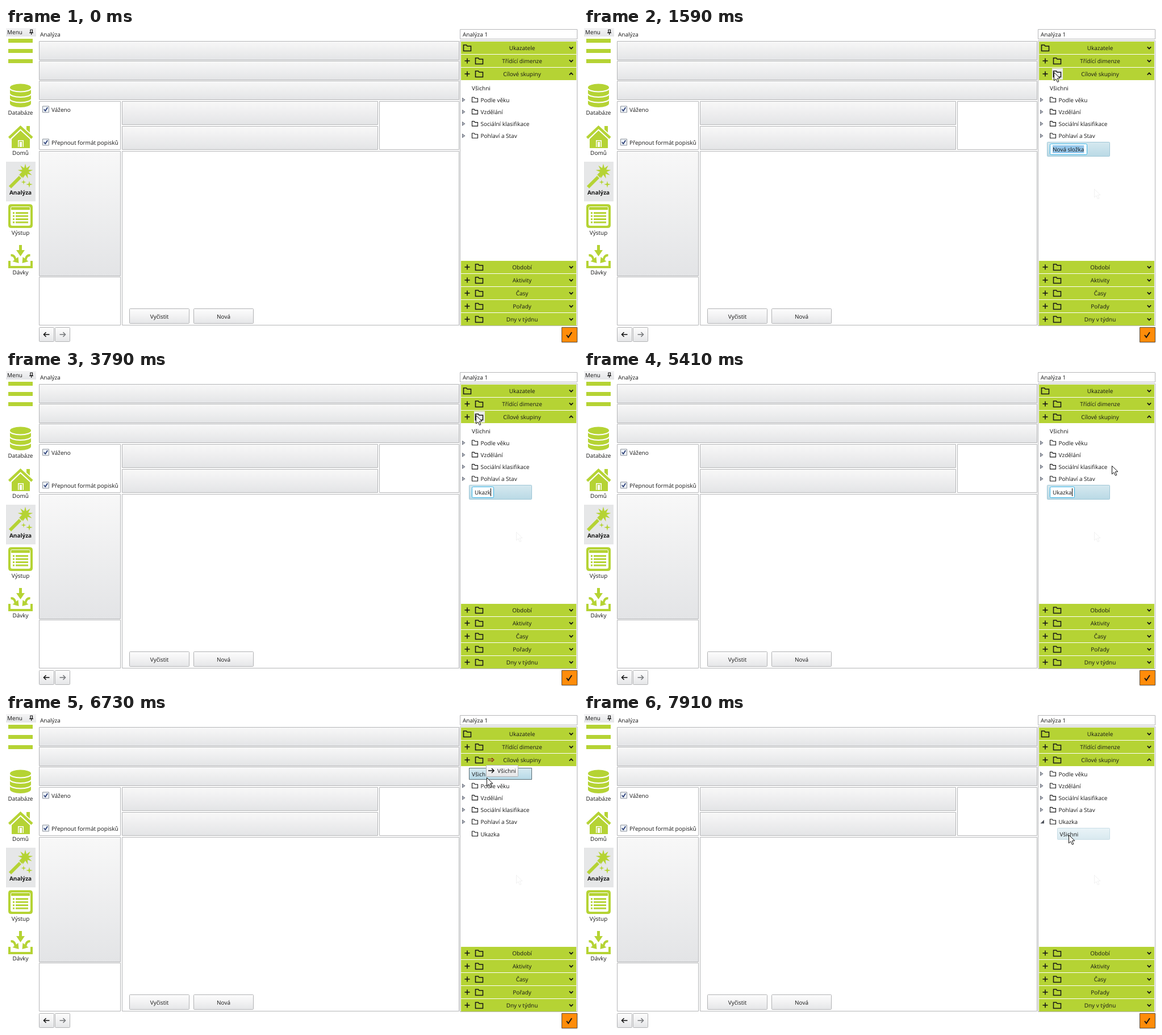
These frames come from a looping animation (1007x556 px, 8000 ms). An HTML page with a canvas:

```html
<!DOCTYPE html>
<html lang="cs">
<head>
<meta charset="utf-8">
<title>Analýza</title>
<style>
html, body { margin: 0; width: 100%; height: 100%; overflow: hidden; background: #fff; }
canvas { display: block; }
</style>
</head>
<body>
<canvas id="stage" width="1007" height="556"></canvas>
<script>
const ctx = document.getElementById('stage').getContext('2d');
const LOOP = 8000, GREEN = '#b5d334', INK = '#161616', BORDER = '#b4b5b7';
const ROW_X = 815, ROW_H = 21.2, TREE_TOP = 94.7;
const FOLDERS = ['Podle věku', 'Vzdělání', 'Sociální klasifikace', 'Pohlaví a Stav'];

const CREATE = 1390, COMMIT = 6290, DRAG = 6730, DROP = 7600, BLINK = 550;
const TYPED = [[CREATE, 'Nová složka'], [2690, 'U'], [2900, 'Uk'], [3020, 'Uka'],
  [3250, 'Ukaz'], [3790, 'Ukazk'], [4100, 'Ukazka']];
// Pointer positions: time, x, y; each is held until the next.
const POINTER = [
  [500, 938, 434], [612, 919, 362], [724, 898, 284], [836, 868, 188], [948, 841, 112], [1060, 827, 78],
  [5080, 834, 64], [5190, 853, 48], [5300, 902, 106], [5410, 929, 167], [5530, 931, 172],
  [5620, 921, 164], [5720, 900, 150], [5830, 880, 138], [5950, 865, 125], [6060, 853, 113],
  [6180, 847, 108], [6290, 844, 106], [6730, 846, 112], [6830, 852, 140], [6930, 858, 176],
  [7030, 860, 205], [7160, 859, 207], [7260, 858, 209], [7700, 856, 211], [7810, 854, 212], [7910, 853, 213]];

const at = (keys, t) => keys.filter(k => k[0] <= t).pop();

function text(s, x, y, { align = 'left', bold = false, color = INK } = {}) {
  ctx.font = (bold ? 'bold ' : '') + '10px "Open Sans", sans-serif';
  ctx.textRendering = 'geometricPrecision';
  ctx.textAlign = align;
  ctx.fillStyle = color;
  ctx.fillText(s, x, y);
}

function fade(y0, y1, ...colors) {
  const g = ctx.createLinearGradient(0, y0, 0, y1);
  colors.forEach((c, i) => g.addColorStop(i / (colors.length - 1), c));
  return g;
}

// Bordered box given by its outer edges.
function box(x0, y0, x1, y1, fill, border = BORDER, radius = 0) {
  ctx.beginPath();
  ctx.roundRect(x0 + .5, y0 + .5, x1 - x0 - 1, y1 - y0 - 1, radius);
  ctx.fillStyle = fill;
  ctx.fill();
  ctx.strokeStyle = border;
  ctx.lineWidth = 1;
  ctx.stroke();
}

const panel = (x0, y0, x1, y1) => box(x0, y0, x1, y1, fade(y0, y1, '#f8f8f8', '#e3e4e6'));
const blank = (x0, y0, x1, y1) => box(x0, y0, x1, y1, '#fff');
const button = (x0, y0, x1, y1) => box(x0, y0, x1, y1, fade(y0, y1, '#fdfdfd', '#f2f2f3', '#e4e5e7'), '#b0b1b3', 1);

function rect(x, y, w, h, color) {
  ctx.fillStyle = color;
  ctx.fillRect(x, y, w, h);
}

function line(points, color = INK, width = 1.5, closed = false) {
  ctx.beginPath();
  points.forEach(([x, y]) => ctx.lineTo(x, y));
  if (closed) ctx.closePath();
  ctx.strokeStyle = color;
  ctx.lineWidth = width;
  ctx.stroke();
}

function poly(points, color) {
  ctx.beginPath();
  points.forEach(([x, y]) => ctx.lineTo(x, y));
  ctx.closePath();
  ctx.fillStyle = color;
  ctx.fill();
}

function folder(x, y, w, h, width) {
  line([[x, y], [x + w * .38, y], [x + w * .5, y + 2], [x + w, y + 2], [x + w, y + h], [x, y + h]], INK, width, true);
}

function star(cx, cy, points, outer, inner) {
  poly(Array.from({ length: points * 2 }, (_, i) => {
    const a = i * Math.PI / points - Math.PI / 2, r = i % 2 ? inner : outer;
    return [cx + r * Math.cos(a), cy + r * Math.sin(a)];
  }), GREEN);
}

function arrow(x, y, dir, color) {
  line([[x - 5 * dir, y], [x + 5 * dir, y]], color, 1.6);
  line([[x + dir, y - 4], [x + 5 * dir, y], [x + dir, y + 4]], color, 1.6);
}

function databaseIcon() {
  ctx.fillStyle = GREEN;
  ctx.beginPath();
  ctx.ellipse(25.5, 105, 18.5, 6.5, 0, Math.PI, 2 * Math.PI);
  ctx.ellipse(25.5, 133, 18.5, 7, 0, 0, Math.PI);
  ctx.fill();
  ctx.strokeStyle = '#fff';
  ctx.lineWidth = 2;
  for (const y of [105.5, 115, 124.5]) {
    ctx.beginPath();
    ctx.ellipse(25.5, y, 19.5, 7, 0, 0, Math.PI);
    ctx.stroke();
  }
}

function houseIcon() {
  rect(36, 173, 6, 14, GREEN);
  poly([[10, 196], [25.5, 181], [42, 196], [42, 212], [10, 212]], GREEN);
  line([[5.5, 194], [25.5, 175], [46, 194]], '#fff', 8);
  line([[5.5, 194], [25.5, 175], [46, 194]], GREEN, 4.5);
  rect(21, 198, 10, 12, '#fff');
  rect(22.5, 199.5, 7, 10.5, GREEN);
  rect(24, 201, 4, 9, '#fff');
}

function wandIcon() {
  line([[7, 281], [31, 257]], GREEN, 6);
  star(34, 253, 9, 13.5, 6);
  line([[23, 260], [28, 265]], '#e6e7e8', 1.5);
  star(31, 272, 4, 4.5, 1.3);
  star(41, 276, 4, 6, 1.7);
}

function listIcon() {
  box(4, 311, 47, 353, GREEN, GREEN, 4);
  box(8, 315, 43, 349, GREEN, '#fff', 2);
  rect(9, 321, 33, 27, '#fff');
  for (let y = 325; y < 346; y += 5.5) {
    rect(12, y, 3, 3, GREEN);
    rect(17, y, 22, 3, GREEN);
  }
}

function trayIcon() {
  rect(23, 383, 5, 11, GREEN);
  poly([[18, 392], [33, 392], [25.5, 403]], GREEN);
  line([[6, 411], [6, 422], [45, 422], [45, 411]], GREEN, 4);
  for (const side of [-1, 1]) {
    const px = d => 25.5 + side * d;
    ctx.beginPath();
    ctx.moveTo(px(17), 401);
    ctx.quadraticCurveTo(px(10), 401, px(9), 409);
    ctx.strokeStyle = GREEN;
    ctx.lineWidth = 4;
    ctx.stroke();
    poly([[px(3), 415], [px(4), 404], [px(14), 412]], GREEN);
  }
}

function menu() {
  rect(0, 0, 53, 15, fade(0, 15, '#f4f4f5', '#e4e5e7'));
  text('Menu', 2, 10.5);
  line([[43, 3], [46.5, 3], [46.5, 8], [43, 8]], INK, 1.2, true);
  line([[41, 8.5], [48, 8.5]], INK, 1.2);
  line([[44.7, 8], [44.7, 12]], INK, 1.2);
  for (const y of [19, 37, 55]) rect(4, y, 43, 7, GREEN);
  rect(0, 236, 52, 70, '#e6e7e8');
  databaseIcon();
  houseIcon();
  wandIcon();
  listIcon();
  trayIcon();
  ['Databáze', 'Domů', 'Analýza', 'Výstup', 'Dávky'].forEach((s, i) =>
    text(s, 25.5, 153 + i * 70.5, { align: 'center', bold: i === 2 }));
}

function checkbox(y, label) {
  box(64, y - 6, 76, y + 6, '#eef3f8', '#8a9099');
  line([[66.8, y], [69.2, y + 2.8], [73.2, y - 3.2]], '#2c3f78', 1.8);
  text(label, 80, y + 4);
}

function workspace() {
  text('Analýza', 60, 15);
  for (const y of [23, 58, 93]) panel(58, y, 798, y + 34);
  blank(58, 129, 202, 215);
  checkbox(143.5, 'Váženo');
  checkbox(201.5, 'Přepnout formát popisků');
  panel(204, 129, 655, 171);
  panel(204, 173, 655, 215);
  blank(657, 129, 798, 215);
  panel(58, 217, 202, 438);
  blank(58, 439, 202, 525);
  blank(204, 217, 798, 525);
  button(217, 495, 323, 522);
  text('Vyčistit', 270, 512.5, { align: 'center' });
  button(330, 495, 436, 522);
  text('Nová', 383, 512.5, { align: 'center' });
  button(58, 528, 85, 554);
  arrow(71.5, 541, -1, INK);
  button(86, 528, 113, 554);
  arrow(99.5, 541, 1, '#77797c');
  box(978, 528, 1006, 555, '#ff8c0a', '#5a4a38');
  line([[987, 542], [990, 546], [996, 537]], INK, 2);
}

function header(label, y, { plus = true, open = false, hover = false } = {}) {
  rect(801, y, 203, 22, GREEN);
  const cy = y + 11;
  if (plus) {
    line([[807.5, cy], [816.5, cy]], INK, 1.6);
    line([[812, cy - 4.5], [812, cy + 4.5]], INK, 1.6);
  }
  if (hover) rect(824, y + 1, 19, 20, '#e8eaea');
  folder(plus ? 826.5 : 805.5, cy - 5, 13, 10.5, 1.5);
  text(label, 908.5, cy + 4, { align: 'center' });
  const d = open ? -1.7 : 1.7;
  line([[991.8, cy - d], [995, cy + d], [998.2, cy - d]], INK, 1.8);
}

function sidebar(folderHover, marked) {
  box(799, 2, 1006, 20, '#fff');
  text('Analýza 1', 804, 15);
  box(799, 22, 1006, 526, '#fff');
  header('Ukazatele', 24, { plus: false });
  header('Třídící dimenze', 47);
  header('Cílové skupiny', 70, { open: true, hover: folderHover });
  ['Období', 'Aktivity', 'Časy', 'Pořady', 'Dny v týdnu'].forEach((s, i) => header(s, 411 + i * 23, {}));
  if (marked) {
    line([[848, 79.5], [857, 79.5]], '#8c2a18', 1.1);
    line([[848, 82.5], [857, 82.5]], '#8c2a18', 1.1);
    line([[855, 77.5], [859, 81], [855, 84.5]], '#8c2a18', 1.2);
  }
}

const rowTop = i => TREE_TOP + i * ROW_H;

function highlight(i, x = ROW_X) {
  const y = Math.round(rowTop(i));
  box(x, y, 926, y + 21, fade(y, y + 21, '#eaf4f8', '#d8e9ef'), '#c8dde6', 1);
}

function treeFolder(label, i, state) {
  const cy = rowTop(i) + 10.8;
  if (state === 'closed') {
    poly([[803, cy - 4], [808.5, cy], [803, cy + 4]], '#70757f');
    poly([[804, cy - 2], [806.8, cy], [804, cy + 2]], '#b9bdca');
  }
  if (state === 'open') poly([[810, cy - 3.5], [810, cy + 3], [803.5, cy + 3]], '#50545c');
  folder(820.5, cy - 4.5, 10, 8.5, 1.1);
  text(label, 835.5, cy + 4);
}

function editor(t) {
  const [since, value] = at(TYPED, t);
  const fresh = since === CREATE;
  box(ROW_X, 201, 926, 227, fade(201, 227, '#d6e9f0', '#b9d9e5'), '#9fc6d6', 1);
  text(value, 825, 218);
  const end = 825 + ctx.measureText(value).width;
  box(820, 204, Math.round(end + 5.5), 224, '#fff', '#35b3e6', 2);
  if (fresh) rect(825, 207, end - 825, 14, '#94c6ea');
  text(value, 825, 218);
  if (!fresh && (t - since) % (2 * BLINK) < BLINK) rect(Math.round(end), 207, 1, 14, '#000');
}

function tree(t, pointer) {
  const dropped = t >= DROP, dragging = t >= DRAG && !dropped;
  const editing = t >= CREATE && t < COMMIT, selected = t >= COMMIT && !dropped;
  const count = t >= CREATE ? 6 : 5;
  let over = -1;
  if (pointer) {
    const [, x, y] = pointer, i = Math.floor((y - TREE_TOP) / ROW_H);
    if (x > ROW_X && x < 926 && i >= 0 && i < count) over = i;
  }
  const childX = dropped && over === 5 ? 833 : ROW_X;
  if (over >= 0 && !(editing && over === 5)) highlight(over, childX);
  if (selected) {
    box(ROW_X, 95, 926, 116, fade(95, 116, '#d8ebf2', '#b5d8e6'), '#a0c8d8', 1);
    ctx.setLineDash([1, 1]);
    line([[815.5, 95.5], [925.5, 95.5], [925.5, 115.5], [815.5, 115.5]], '#111', 1, true);
    ctx.setLineDash([]);
  }
  const first = dropped ? 0 : 1;
  FOLDERS.forEach((s, i) => treeFolder(s, i + first, 'closed'));
  if (dropped) {
    treeFolder('Ukazka', 4, 'open');
    text('Všichni', 837.5, 215.5);
  } else {
    text('Všichni', 820, 109.5);
    if (editing) editor(t);
    if (selected) treeFolder('Ukazka', 5);
  }
  if (dragging) dragMarks(pointer, over);
}

function dragMarks([, x, y], over) {
  const inside = y - rowTop(over);
  if (over > 0 && (inside < 6 || inside > 16)) {
    const ly = Math.round(rowTop(inside < 6 ? over : over + 1)) - .5;
    line([[808.5, ly], [926, ly]], '#2f7fae', 2);
    ctx.beginPath();
    ctx.arc(805.5, ly, 2.7, 0, 2 * Math.PI);
    ctx.stroke();
  }
  button(x - 1, y - 22, x + 56, y - 1);
  arrow(x + 8, y - 12, 1, INK);
  text('Všichni', x + 19, y - 8);
}

function cursor(x, y, alpha = 1) {
  const shape = [[0, 0], [0, 14.5], [3.4, 11.4], [6, 17], [8.4, 16], [5.8, 10.4], [10.5, 10.2]];
  ctx.save();
  ctx.globalAlpha = alpha;
  ctx.translate(x + .5, y + .5);
  poly(shape, '#fff');
  line(shape, '#111', 1, true);
  ctx.restore();
}

function draw(t) {
  const pointer = at(POINTER, t);
  rect(0, 0, 1007, 556, '#fff');
  menu();
  workspace();
  sidebar(t >= 1060 && t < 5080, t >= COMMIT && t < DROP);
  tree(t, pointer);
  if (t >= 836) cursor(898, 284, .06);
  if (pointer) cursor(pointer[1], pointer[2]);
}

const start = performance.now();
function tick() {
  draw((performance.now() - start) % LOOP);
  requestAnimationFrame(tick);
}
tick();
</script>
</body>
</html>
```
